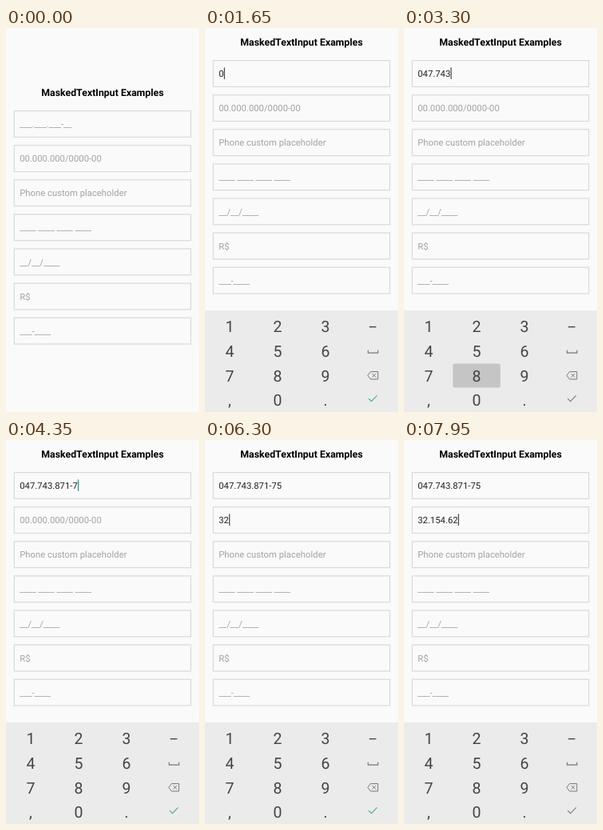
Write an HTML page that moves like this. It is 242x480 px and loops after 8000 ms.

```html
<!DOCTYPE html>
<html lang="en">
<head>
<meta charset="utf-8">
<title>MaskedTextInput Examples</title>
<style>
  html, body { margin: 0; width: 100%; height: 100%; overflow: hidden; background: #fafafa; }
  svg { display: block; width: 100%; height: 100%; }
  text { font-family: Roboto, "Noto Sans", sans-serif; text-rendering: geometricPrecision; }
  .title { font-size: 12.35px; font-weight: 700; text-anchor: middle; fill: #000; }
  .box { fill: none; stroke: #dadada; stroke-width: 1.2; }
  .value { font-size: 11.3px; fill: #222; white-space: pre; }
  .value.hint { fill: #a3a3a3; }
  .key { font-size: 19.6px; text-anchor: middle; fill: #454545; }
  .icon { fill: none; stroke: #777; stroke-width: 1; }
</style>
</head>
<body>
<svg id="stage" viewBox="0 0 242 480">
  <g id="form">
    <text class="title" x="121" y="85.4">MaskedTextInput Examples</text>
    <rect id="caret" width="1.2" height="14.5"/>
  </g>
  <g id="keyboard">
    <rect y="353" width="242" height="140" fill="#ebebeb"/>
    <rect id="press" width="59.5" height="30" rx="2" fill="#c5c5c5"/>
    <path class="icon" d="M206 373.6h8.6" style="stroke:#454545;stroke-width:1.4"/>
    <path class="icon" d="M204.5 402.8v3.4h12.4v-3.4" style="stroke-width:1.2"/>
    <path class="icon" d="M207.6 429.6h9.2v9.4h-9.2l-3.6-4.7zM209.7 432.1l4.4 4.4m0-4.4l-4.4 4.4"/>
    <path class="icon" id="tick" d="M205.2 463.2l3.4 3.4 7.2-7.2" style="stroke-width:1.2"/>
  </g>
</svg>
<script>
const LOOP = 8000, STEP = 150;
const PITCH = 43.1, LEFT = 17.2;
const COLS = [31, 91, 151], ROWS = [373.2, 404, 434.5, 465.2];
const KEYS = ['123', '456', '789', ',0.'];
const HINTS = ['___.___.___-__', '00.000.000/0000-00', 'Phone custom placeholder',
  '____ ____ ____ ____', '__/__/____', 'R$', '___-____'];
const MASKS = ['000.000.000-00', '00.000.000/0000-00'];
const FOCUS = [450, 5100];

// [time the key goes down, digit]; the digit shows one step later
const TAPS = [
  [1350, 0], [1800, 4], [2250, 7], [2550, 7], [2850, 4], [3000, 3], [3300, 8],
  [3600, 7], [3900, 1], [4200, 7], [4500, 5],
  [5550, 3], [6000, 2], [6450, 1], [6750, 5], [7050, 4], [7350, 6], [7650, 2]
];
const SLIDE = [[0, 130], [600, 66], [750, 15.7], [900, 3], [1050, 0]];

const $ = id => document.getElementById(id);
const form = $('form'), keyboard = $('keyboard'), caret = $('caret'),
  press = $('press'), tick = $('tick');

function add(parent, tag, attrs, text = '') {
  const el = document.createElementNS('http://www.w3.org/2000/svg', tag);
  for (const name in attrs) el.setAttribute(name, attrs[name]);
  el.textContent = text;
  return parent.appendChild(el);
}

function move(el, x, y) {
  el.setAttribute('transform', `translate(${x} ${y})`);
}

const fields = HINTS.map((hint, i) => {
  const y = 103.6 + i * PITCH;
  add(form, 'rect', { class: 'box', x: 10.3, y, width: 221.4, height: 32.8 });
  return add(form, 'text', { class: 'value hint', x: LEFT, y: y + 20.5 }, hint);
});

KEYS.forEach((row, r) => [...row].forEach((label, c) =>
  add(keyboard, 'text', { class: 'key', x: COLS[c], y: ROWS[r] + 7 }, label)));

function applyMask(mask, digits) {
  let out = '', n = 0;
  for (const ch of mask) {
    if (n === digits.length) break;
    out += ch === '0' ? digits[n++] : ch;
  }
  return out;
}

function keyCell(digit) {
  return digit ? [(digit - 1) % 3, Math.floor((digit - 1) / 3)] : [1, 3];
}

function draw(time) {
  const t = Math.floor(time / STEP) * STEP;
  const active = FOCUS.filter(f => t >= f).length - 1;
  const typed = TAPS.filter(([at]) => t >= at + STEP);
  const down = TAPS.find(([at]) => t >= at && t < at + STEP);

  MASKS.forEach((mask, i) => {
    const digits = typed.filter(([at]) => (at >= FOCUS[1]) === (i === 1)).map(tap => tap[1]);
    fields[i].textContent = digits.length ? applyMask(mask, digits) : HINTS[i];
    fields[i].classList.toggle('hint', !digits.length);
  });

  move(form, 0, t >= 600 ? -63 : 0);
  move(keyboard, 0, SLIDE.filter(([at]) => t >= at).pop()[1]);

  // the caret blinks, starting afresh after every change
  const last = Math.max(FOCUS[active] || 0, ...typed.map(([at]) => at + STEP));
  const shown = active >= 0 && (t - last) % 1000 < 500;
  caret.style.visibility = shown ? 'visible' : 'hidden';
  if (shown) {
    const field = fields[active];
    const width = field.classList.contains('hint') ? 0 : field.getComputedTextLength();
    move(caret, LEFT + width + 0.2, 112.4 + active * PITCH);
    caret.setAttribute('fill', t >= 4050 && t < 5100 ? '#2f8f8b' : '#444');
  }

  press.style.visibility = down ? 'visible' : 'hidden';
  if (down) {
    const [col, row] = keyCell(down[1]);
    move(press, COLS[col] - 29.7, ROWS[row] + 15 - 30);
  }
  const grey = down || t < 1050 || t >= 7650;
  tick.style.stroke = grey ? '#808080' : '#4caaa0';
}

function loop(now) {
  draw(now % LOOP);
  requestAnimationFrame(loop);
}
draw(0);
requestAnimationFrame(loop);
</script>
</body>
</html>
```
